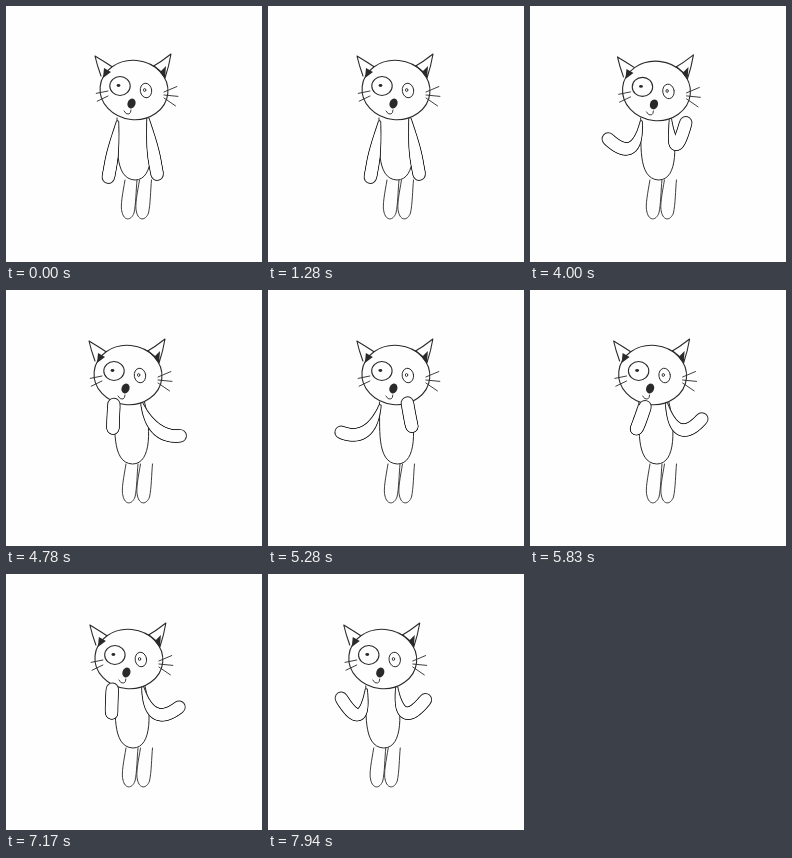
These frames come from a looping animation (256x256 px, 8000 ms). An HTML page with a canvas:

```html
<!DOCTYPE html>
<html lang="en">
<head>
<meta charset="utf-8">
<title>Dancing cat</title>
<style>
html, body { margin: 0; width: 100%; height: 100%; overflow: hidden; background: #fefefe; }
canvas { display: block; width: 256px; height: 256px; }
</style>
</head>
<body>
<canvas id="stage" width="256" height="256"></canvas>
<script>
const ctx = document.getElementById('stage').getContext('2d');
const INK = '#2a2a2a', PAPER = '#fefefe';
const LOOP = 8000, STEP = LOOP / 144;
const DANCE_START = 3390, LEFT_PEAK = 6460, BEAT = 1130, LIFT_PEAK = 6270, LIFT_PERIOD = 3100;

const wave = (time, peak, period) => Math.cos((time - peak) / period * 2 * Math.PI);
const mix = (a, b, amount) => a + (b - a) * amount;
const radians = (degrees) => degrees * Math.PI / 180;

function ease(time, from, to) {
  const p = Math.min(1, Math.max(0, (time - from) / (to - from)));
  return p * p * (3 - 2 * p);
}

function stroke(path, width = 1) {
  ctx.lineWidth = width;
  ctx.stroke(path);
}

function outline(path, width) {
  ctx.fillStyle = PAPER;
  ctx.fill(path);
  stroke(path, width);
}

function oval(x, y, rx, ry, angle = 0) {
  const path = new Path2D();
  path.ellipse(x, y, rx, ry, angle, 0, Math.PI * 2);
  return path;
}

function shifted(x, y, draw) {
  ctx.save();
  ctx.translate(x, y);
  draw();
  ctx.restore();
}

const body = new Path2D('M111 112 C112 135 107 173 129 174 C149 174 147 135 141 112');
const leg = new Path2D('M119 174 C117 186 114 200 116 206 C118 215 125 215 128 207 C130 198 130 184 131 174');
const ears = new Path2D('M95 70 Q91 59 89 50 Q99 56 108 62 M146 61 Q155 56 165 48 Q163 60 159 72');
const earShade = new Path2D('M97 72 L98 62 L105 66Z M154 66 L160 60 L159 73Z');
const earLine = new Path2D('M148 60 L159 69');
const mouth = new Path2D('M118 105 Q120 109 123 108 Q125 107 125 104');

function head() {
  outline(ears, 1.1);
  outline(oval(128, 84, 34, 29.7, 0.1), 1.1);
  stroke(oval(114, 80, 10.2, 9.5), 1.1);
  stroke(oval(140, 84.5, 5.7, 7.3, -0.15), 1);
  stroke(oval(138.7, 84, 1.2, 1.5), 0.9);
  stroke(mouth, 0.9);
  stroke(earLine, 1.2);
  ctx.fillStyle = INK;
  ctx.fill(earShade);
  ctx.fill(oval(112.5, 79.5, 1.9, 1.4));
  ctx.fill(oval(125.5, 97.5, 4, 5, 0.35));
  for (let i = 0; i < 3; i++) whisker(158, 86 + 3 * i, 14, -0.4 + 0.5 * i);
  for (let i = 0; i < 2; i++) whisker(102, 85 + 5 * i, -12, -0.2 - 0.25 * i);
}

function whisker(x, y, length, angle) {
  const path = new Path2D();
  path.moveTo(x, y);
  path.lineTo(x + length * Math.cos(angle), y + length * Math.sin(angle));
  stroke(path, 0.9);
}

// A soft limb, narrow at the shoulder: a dark pass, then a thinner paper pass.
function limb(sx, sy, ex, ey, hx, hy) {
  const cx = 2 * ex - (sx + hx) / 2, cy = 2 * ey - (sy + hy) / 2;
  const curve = (a, c, b, t) => (1 - t) ** 2 * a + 2 * t * (1 - t) * c + t * t * b;
  const point = (t) => [curve(sx, cx, hx, t), curve(sy, cy, hy, t)];
  const count = 32;
  for (const [color, grow] of [[INK, 0.45], [PAPER, -0.5]]) {
    ctx.strokeStyle = color;
    for (let i = 1; i <= count; i++) {
      const radius = 1 + 5.2 * Math.sin(Math.min(1, i / count * 1.4) * Math.PI / 2);
      ctx.lineWidth = 2 * (radius + grow);
      ctx.beginPath();
      ctx.moveTo(...point((i - 1) / count));
      ctx.lineTo(...point(i / count));
      ctx.stroke();
    }
  }
  ctx.strokeStyle = INK;
}

// Angles are in degrees from hanging straight down, growing outwards.
// out runs from -1 (tucked to the chest) to 1 (stretched away).
function arm(x, y, side, out, lift, dance) {
  const upper = radians(mix(9, 18 + 13 * out, dance));
  const fore = radians(mix(10, 148 - 54 * out + 20 * lift, dance));
  const upperLength = mix(32, 26 + 3.5 * out, dance), foreLength = 24;
  const ex = x + side * upperLength * Math.sin(upper), ey = y + upperLength * Math.cos(upper);
  limb(x, y, ex, ey, ex + side * foreLength * Math.sin(fore), ey + foreLength * Math.cos(fore));
}

function draw(time) {
  const dance = ease(time, DANCE_START, DANCE_START + 750);
  const swing = -wave(time, LEFT_PEAK, BEAT);
  const lift = wave(time, LIFT_PEAK, LIFT_PERIOD);
  const step = -15 * ease(time, 7500, 7950);
  const sway = 0.4 * Math.sin(time / 1280 * 2 * Math.PI) * (1 - dance);

  const headX = dance * (-3 - 3 * swing) + 0.7 * step - sway;
  const headY = dance;
  const hipX = dance + step + sway;
  const bodyX = (headX + hipX) / 2;

  ctx.fillStyle = PAPER;
  ctx.fillRect(0, 0, 256, 256);
  ctx.strokeStyle = INK;
  ctx.lineCap = ctx.lineJoin = 'round';
  for (const offset of [0, 14.5]) shifted(hipX + offset, 0, () => outline(leg, 0.9));
  shifted(bodyX, 0, () => outline(body, 1));
  shifted(headX, headY, head);
  arm(111.5 + bodyX, 116, -1, -swing, lift, dance);
  arm(142 + headX, 113 + headY, 1, swing, lift, dance);
}

const start = performance.now();
function tick() {
  const time = (performance.now() - start) % LOOP;
  draw(Math.floor(time / STEP) * STEP);
  requestAnimationFrame(tick);
}
tick();
</script>
</body>
</html>
```
